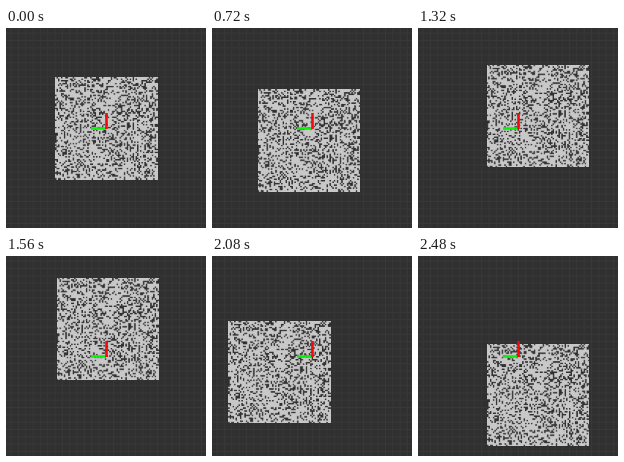
An HTML page with a canvas for the animation above (2520 ms loop, 200x200 px).

```html
<!DOCTYPE html>
<html lang="en">
<head>
<meta charset="utf-8">
<title>Moving grid map</title>
<style>
  html, body { margin: 0; width: 100%; height: 100%; overflow: hidden; background: #303030; }
  canvas { display: block; width: 100vmin; height: 100vmin; }
</style>
</head>
<body>
<canvas id="stage" width="200" height="200"></canvas>
<script>
const ctx = document.getElementById('stage').getContext('2d');
const STEP = 40, STEPS = 63;
const CELLS = 70, CELL = 3;
const METRE = 146.4, SIZE = 0.7 * METRE, CENTRE = 100.3;

let seed = 7;
const random = () => (seed = (seed * 16807) % 2147483647) / 2147483647;

// Noise map, drawn oversized so that scaling down softens the cell edges.
const map = document.createElement('canvas');
map.width = map.height = CELLS * CELL;
const cells = map.getContext('2d');
cells.fillStyle = '#c8c8c8';
for (let y = 0; y < CELLS; y++)
  for (let x = 0; x < CELLS; x++)
    if (random() < 0.71) cells.fillRect(x * CELL, y * CELL, CELL, CELL);

function rect(color, x, y, w, h) {
  ctx.fillStyle = color;
  ctx.fillRect(x, y, w, h);
}

function drawGrid() {
  rect('#303030', 0, 0, 200, 200);
  const pitch = METRE / 20;
  for (let p = CENTRE % pitch; p < 200; p += pitch) {
    rect('#383838', p - 0.5, 0, 1, 200);
    rect('#383838', 0, p - 0.5, 200, 1);
  }
}

function drawMap(t) {
  // Archimedean spiral with x pointing up and y pointing left
  const r = 0.03 * t * METRE;
  const x = CENTRE - SIZE / 2 - r * Math.sin(t);
  const y = CENTRE - SIZE / 2 - r * Math.cos(t);
  rect('#303030', x, y, SIZE, SIZE);
  ctx.imageSmoothingQuality = 'high';
  ctx.drawImage(map, x, y, SIZE, SIZE);
}

function drawAxes() {
  rect('#0af00a', 85, 99.2, 15, 2.6);
  rect('#fa0808', 99.2, 85, 2.6, 16);
}

function frame() {
  const step = Math.floor(performance.now() / STEP) % STEPS;
  drawGrid();
  drawMap(step * 0.1597);
  drawAxes();
  requestAnimationFrame(frame);
}
frame();
</script>
</body>
</html>
```
